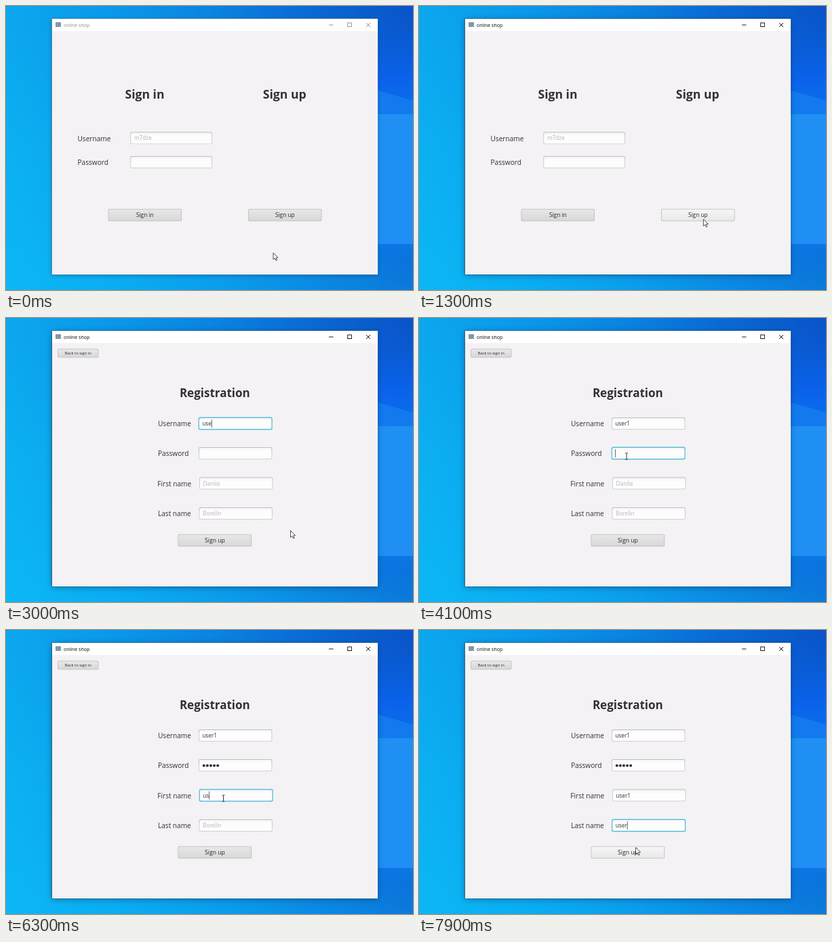
An HTML page with a canvas for the animation above (8000 ms loop, 600 by 420 pixels).

```html
<!DOCTYPE html>
<html lang="en">
<head>
<meta charset="utf-8">
<title>Online shop registration</title>
<style>
html, body { margin: 0; width: 100%; height: 100%; overflow: hidden; background: #0b8fe4; }
canvas { display: block; width: 600px; height: 420px; }
</style>
</head>
<body>
<canvas id="stage" width="600" height="420"></canvas>
<script>
const ctx = document.getElementById('stage').getContext('2d');
const LOOP = 8000, STEP = 100;
const PAGE_SWITCH = 1400, PRESS = 1200;
const DARK = '#323035', PROMPT = '#b4b2b5';

const fields = [
  { label: 'Username', lx: 224, x: 284, y: 147, focus: PAGE_SWITCH, text: 'user1', start: 2500, gap: 200 },
  { label: 'Password', lx: 224, x: 284, y: 191, focus: 4000, text: '●●●●●', start: 4400, gap: 170, secret: true },
  { label: 'First name', lx: 223.3, x: 285, y: 235.5, focus: 5600, text: 'user1', start: 6000, gap: 170, prompt: 'Danila' },
  { label: 'Last name', lx: 224, x: 284.5, y: 280, focus: 7000, text: 'user1', start: 7200, gap: 200, prompt: 'Borelin' }
];

// time, x, y
const path = [
  [0, 394, 365], [200, 394, 365], [800, 419, 316], [1200, 419.3, 315.5], [1600, 419.5, 314.5],
  [3300, 419.5, 314.5], [3900, 306, 204.5], [4900, 306, 204.5], [5400, 320, 250],
  [6300, 320.5, 249], [6700, 320.5, 249], [6950, 320, 289], [7450, 320, 289], [7800, 319.5, 321.5], [8000, 319.5, 321.5]
];

function pointer(t) {
  let i = 1;
  while (i < path.length - 1 && t > path[i][0]) i++;
  const [t0, x0, y0] = path[i - 1], [t1, x1, y1] = path[i];
  const u = Math.min(1, (t - t0) / (t1 - t0)), k = u * u * (3 - 2 * u);
  return { x: x0 + (x1 - x0) * k, y: y0 + (y1 - y0) * k };
}

function gradient(x0, y0, x1, y1, ...colors) {
  const g = ctx.createLinearGradient(x0, y0, x1, y1);
  colors.forEach((c, i) => g.addColorStop(i / (colors.length - 1), c));
  return g;
}

function box(x, y, w, h, fill) {
  ctx.fillStyle = fill;
  ctx.fillRect(x, y, w, h);
}

function rounded(x, y, w, h, r, fill) {
  ctx.beginPath();
  ctx.roundRect(x, y, w, h, r);
  ctx.fillStyle = fill;
  ctx.fill();
}

function poly(points, fill, stroke, width = 1) {
  ctx.beginPath();
  points.forEach(([x, y]) => ctx.lineTo(x, y));
  if (fill) { ctx.closePath(); ctx.fillStyle = fill; ctx.fill(); }
  if (stroke) { ctx.strokeStyle = stroke; ctx.lineWidth = width; ctx.stroke(); }
}

function write(s, x, y, size, color = DARK, weight = 400, align = 'left') {
  ctx.font = `${weight} ${size}px "Open Sans", "Noto Sans", sans-serif`;
  ctx.textAlign = align;
  ctx.fillStyle = color;
  ctx.fillText(s, x, y);
}

function inside(p, x, y, w, h) {
  return p.x >= x && p.x <= x + w && p.y >= y && p.y <= y + h;
}

function button(s, x, y, w, h, size, p, pressed) {
  const hot = inside(p, x, y, w, h);
  rounded(x, y, w, h, 2.5, '#bdbbbd');
  const face = pressed ? ['#d0cfd0', '#dcdbdc'] : hot ? ['#f7f6f7', '#e9e8e9'] : ['#e9e8e9', '#d8d7d8'];
  rounded(x + 0.8, y + 0.8, w - 1.6, h - 1.6, 2, gradient(0, y, 0, y + h, ...face));
  write(s, x + w / 2, y + h / 2 + size * 0.36, size, '#262428', 400, 'center');
}

function input(x, y, w, h, focused) {
  if (focused) {
    rounded(x - 0.8, y - 0.8, w + 1.6, h + 1.6, 3, '#bfe5ee');
    rounded(x - 0.2, y - 0.2, w + 0.4, h + 0.4, 2.5, '#52bdd5');
  } else {
    rounded(x, y, w, h, 2.5, gradient(0, y, 0, y + h, '#bfbdc0', '#d2d0d3'));
  }
  rounded(x + 0.9, y + 0.9, w - 1.8, h - 1.8, 1.8, gradient(0, y, 0, y + h, '#f4f3f5', '#fefdfe', '#fefdfe', '#fefdfe'));
}

function wallpaper() {
  box(0, 0, 600, 420, gradient(0, 40, 600, 0, '#0caeef', '#0a9eec', '#0a88e2', '#0a6ad4', '#0a52c6'));
  box(0, 0, 600, 420, gradient(0, 0, 0, 420, 'rgba(5,90,215,0.08)', 'rgba(10,190,255,0.12)', 'rgba(12,200,255,0.32)'));
  box(548, 0, 52, 420, gradient(0, 0, 0, 420, 'rgba(10,88,212,0)', '#0a62ea', '#0c7cee', '#0c7cee', 'rgba(10,106,222,0)'));
  poly([[548, 125], [600, 140], [600, 200], [548, 200]], '#127aee');
  poly([[548, 330], [600, 330], [600, 358], [548, 350]], '#0c76e6');
  box(548, 160, 52, 192, '#1f8ff4');
}

function frame(active) {
  ctx.save();
  ctx.shadowColor = active ? 'rgba(0,35,85,0.45)' : 'rgba(0,35,85,0.32)';
  ctx.shadowBlur = active ? 9 : 6;
  ctx.shadowOffsetY = 1.5;
  box(67, 18.4, 481.3, 379.2, active ? '#2c617f' : '#6089a4');
  ctx.restore();
  box(68, 19, 480, 378, '#f4f2f4');
  box(68, 19, 480, 18, '#ffffff');
  const ink = active ? '#000000' : '#8c8b8d';
  box(73, 24, 8, 7, '#8398a8');
  write('online shop', 85, 30.8, 7, ink);
  poly([[476, 28], [482.5, 28]], null, ink, 0.9);
  ctx.strokeRect(503.7, 25, 5.6, 5.6);
  poly([[531, 25], [537, 31]], null, ink, 0.9);
  poly([[537, 25], [531, 31]], null, ink, 0.9);
}

function signIn(t, p) {
  write('Sign in', 204.5, 137, 17.6, DARK, 700, 'center');
  write('Sign up', 410.7, 137, 17.6, DARK, 700, 'center');
  write('Username', 105.5, 199.5, 10.1);
  write('Password', 105.5, 235.3, 10.1);
  input(183.3, 186.3, 120.7, 18, false);
  input(183.3, 222, 120.7, 18, false);
  write('m7dze', 189, 198.3, 8.2, PROMPT);
  button('Sign in', 150.5, 300, 108.5, 18.3, 8.3, p);
  button('Sign up', 357, 300, 108.5, 18.3, 8.3, p, t >= PRESS && t < PRESS + 100);
}

function typed(f, t) {
  const n = t < f.start ? 0 : Math.min(f.text.length, 1 + Math.floor((t - f.start) / f.gap));
  return { s: f.text.slice(0, n), last: n ? f.start + (n - 1) * f.gap : f.focus };
}

function entry(f, i, t) {
  const next = fields[i + 1];
  const focused = t >= f.focus && !(next && t >= next.focus);
  const { s, last } = typed(f, t);
  const base = f.y + 12;
  write(f.label, f.lx, f.y + 13, 10.1);
  input(f.x, f.y, 108.3, 18, focused);
  const left = f.x + 5.2;
  let end = left;
  if (f.secret) {
    ctx.fillStyle = DARK;
    for (let k = 0; k < s.length; k++) {
      ctx.beginPath();
      ctx.arc(left + 2.5 + k * 5.1, f.y + 9.4, 2, 0, 7);
      ctx.fill();
    }
    end += s.length * 5.1;
  } else {
    write(s, left, base, 8.3);
    end += ctx.measureText(s).width;
  }
  if (!s && !focused && f.prompt) write(f.prompt, left + 0.3, base, 8.3, PROMPT);
  if (focused && Math.floor((t - last) / 500) % 2 === 0) box(end, f.y + 3.2, 0.8, 12, '#48464a');
}

function registration(t, p) {
  button('Back to sign in', 76, 45.5, 60.5, 13, 5.85, p);
  write('Registration', 307.8, 117.3, 17, DARK, 700, 'center');
  fields.forEach((f, i) => entry(f, i, t));
  button('Sign up', 253.5, 319.7, 108.7, 18.4, 8.6, p);
}

function cursor(p, beam) {
  ctx.save();
  ctx.translate(p.x, p.y);
  if (beam) {
    poly([[0, -4.5], [0, 4.5]], null, '#3a3a3c', 1);
    poly([[-2.2, -4.7], [2.2, -4.7]], null, '#3a3a3c', 0.8);
    poly([[-2.2, 4.7], [2.2, 4.7]], null, '#3a3a3c', 0.8);
  } else {
    ctx.lineJoin = 'round';
    poly([[0, 0], [0, 10], [2.3, 7.9], [4, 11.5], [5.6, 10.8], [4, 7.3], [7, 7.1], [0, 0]], '#ffffff', '#3a3a3e', 0.9);
  }
  ctx.restore();
}

function draw(t) {
  const p = pointer(t), registering = t >= PAGE_SWITCH;
  wallpaper();
  frame(t >= PRESS);
  if (registering) registration(t, p);
  else signIn(t, p);
  cursor(p, registering && fields.some(f => inside(p, f.x, f.y, 108, 18)));
}

const begin = performance.now();
function tick() {
  const t = (performance.now() - begin) % LOOP;
  draw(Math.floor(t / STEP) * STEP);
  requestAnimationFrame(tick);
}
tick();
</script>
</body>
</html>
```
